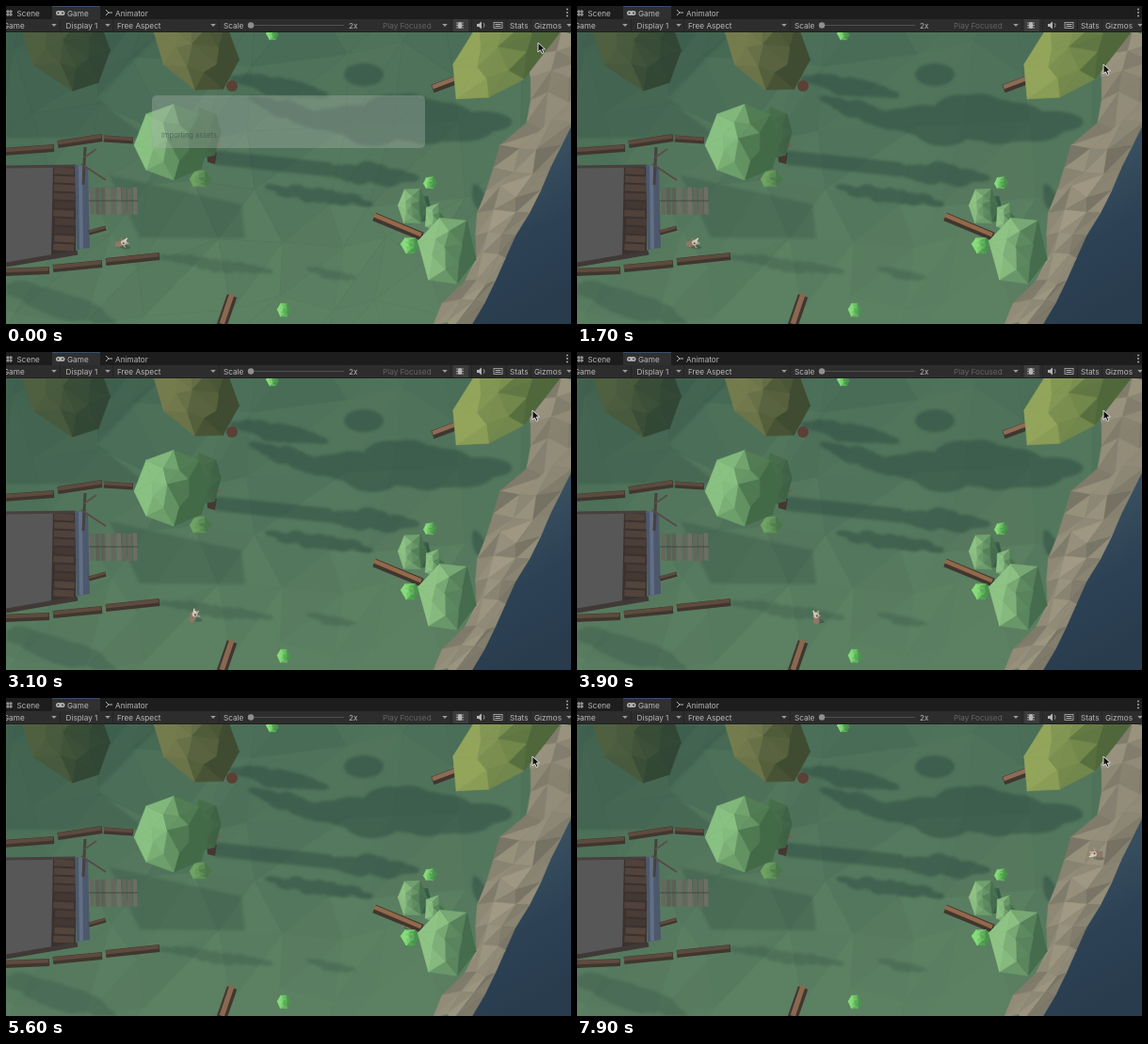
Write an HTML page with a canvas that moves like this. It is 600 by 338 pixels and loops after 8000 ms.

```html
<!DOCTYPE html>
<html lang="en">
<head>
<meta charset="utf-8">
<title>Game view</title>
<style>
html, body { margin: 0; width: 100%; height: 100%; overflow: hidden; background: #222; }
canvas { display: block; width: 100vw; height: 100vh; }
</style>
</head>
<body>
<canvas id="stage" width="600" height="338"></canvas>
<script>
const stage = document.getElementById('stage').getContext('2d');
const LOOP = 8000;
let g = stage;
let seed = 11;
const rnd = () => (seed = seed * 16807 % 2147483647) / 2147483647;
const jitter = size => (rnd() - 0.5) * size;
const mix = (a, b, k) => a + (b - a) * k;
const clamp = k => Math.max(0, Math.min(1, k));
const blend = (a, b, k) => `rgb(${a.map((v, i) => Math.round(mix(v, b[i], clamp(k))))})`;
const points = s => s.split(' ').map(p => p.split(',').map(Number));

// Smooth curve through keys of the form [position, value, value...].
function spline(keys, t) {
  const last = keys.length - 1;
  const i = keys.findIndex(k => k[0] > t);
  if (i <= 0) return keys[i ? last : 0].slice(1);
  const a = keys[i - 1], b = keys[i], span = b[0] - a[0], k = (t - a[0]) / span;
  const slope = (n, j) => n && n < last
    ? (keys[n + 1][j] - keys[n - 1][j]) / (keys[n + 1][0] - keys[n - 1][0]) : 0;
  return a.slice(1).map((v, n) => mix(v, b[n + 1], k * k * (3 - 2 * k))
    + span * k * (1 - k) * ((1 - k) * slope(i - 1, n + 1) - k * slope(i, n + 1)));
}

function layer(draw) {
  const outer = g, c = document.createElement('canvas');
  c.width = 600;
  c.height = 338;
  g = c.getContext('2d');
  draw();
  g = outer;
  return c;
}

function poly(pts, color, edge) {
  if (typeof pts === 'string') pts = points(pts);
  g.beginPath();
  pts.forEach(p => g.lineTo(p[0], p[1]));
  g.closePath();
  g.fillStyle = color;
  g.fill();
  if (edge) {
    g.strokeStyle = color;
    g.lineWidth = 0.7;
    g.stroke();
  }
}

function oval(x, y, rx, ry, color, turn = 0) {
  g.beginPath();
  g.ellipse(x, y, rx, ry, turn, 0, Math.PI * 2);
  g.fillStyle = color;
  g.fill();
}

function line(x1, y1, x2, y2, color, width = 1) {
  g.beginPath();
  g.moveTo(x1, y1);
  g.lineTo(x2, y2);
  g.strokeStyle = color;
  g.lineWidth = width;
  g.stroke();
}

const middle = pts => [0, 1].map(j => pts.reduce((s, p) => s + p[j], 0) / pts.length);

// Triangle mesh: place gives each node, tone the colour of each face.
function mesh(cols, rows, place, tone) {
  const nodes = Array.from({ length: rows + 1 }, (_, y) => Array.from({ length: cols + 1 }, (_, x) => place(x, y)));
  const face = (tri, x) => poly(tri, tone(...middle(tri), x), true);
  for (let y = 0; y < rows; y++) {
    for (let x = 0; x < cols; x++) {
      const [a, b] = nodes[y].slice(x), [c, d] = nodes[y + 1].slice(x);
      face([a, b, c], x);
      face([b, c, d], x);
    }
  }
}

// Faceted crown of a tree or bush, lit from the left.
function crown(x, y, rx, ry, turn, n, dark, light) {
  const ring = (scale, shift) => Array.from({ length: n }, (_, i) => {
    const a = (i + shift) * Math.PI * 2 / n + jitter(1.6 / n), s = scale * (1 + jitter(0.12));
    const u = rx * s * Math.cos(a), v = ry * s * Math.sin(a);
    return [x + u * Math.cos(turn) - v * Math.sin(turn), y + u * Math.sin(turn) + v * Math.cos(turn)];
  });
  const outer = ring(1.05, 0), inner = ring(0.55, 0.5), r = Math.max(rx, ry);
  const face = tri => {
    const [mx, my] = middle(tri);
    poly(tri, blend(dark, light, 0.55 - (mx - x) / r - (my - y) * 0.2 / r + jitter(0.3)), true);
  };
  outer.forEach((p, i) => {
    const j = (i + 1) % n;
    face([p, outer[j], inner[i]]);
    face([outer[j], inner[i], inner[j]]);
    face([inner[i], inner[j], [x - rx * 0.1, y - ry * 0.1]]);
  });
}

function log(x1, y1, x2, y2, w = 8, top = '#5d4b3e') {
  line(x1, y1, x2, y2, '#40362f', w);
  line(x1, y1 - w / 5, mix(x1, x2, 0.98), y2 - w / 5, top, w / 2);
}

function ground() {
  mesh(11, 6, (x, y) => [(x - 0.5) * 62 + jitter(46), (y - 0.1) * 66 + jitter(46)],
    (x, y) => blend([64, 99, 81], [92, 128, 98], 0.22 + y / 480 + x / 2600 + jitter(0.22)));
}

// Ragged leaf shadow: overlapping ovals strewn along a line.
function leaves(x1, y1, x2, y2, size) {
  const n = 9, turn = Math.atan2(y2 - y1, x2 - x1);
  for (let i = 0; i < n; i++) {
    const k = i / (n - 1), bulge = 0.45 + 0.55 * Math.sin(k * Math.PI);
    oval(mix(x1, x2, k), mix(y1, y2, k) + jitter(size * 0.5), size * 1.3, size * bulge, '#28443e', turn);
  }
}

function shadows() {
  const deep = layer(() => {
    leaves(250, 78, 330, 92, 10);
    leaves(270, 102, 350, 128, 10);
    leaves(350, 122, 505, 124, 25);
    oval(380, 73, 21, 12, '#28443e');
    line(222, 161, 345, 174, '#28443e', 15);
    leaves(345, 174, 425, 183, 11);
    leaves(285, 195, 380, 208, 8);
    leaves(500, 198, 506, 214, 7);
  });
  const soft = layer(() => {
    poly('0,28 165,28 96,98 150,140 0,140', '#28443e');
    poly('110,180 250,211 254,247 142,246', '#28443e');
    leaves(170, 266, 275, 283, 7);
    leaves(325, 281, 365, 289, 5);
    leaves(10, 300, 100, 330, 14);
  });
  g.filter = 'blur(1.5px)';
  g.globalAlpha = 0.44;
  g.drawImage(deep, 0, 0);
  g.globalAlpha = 0.25;
  g.drawImage(soft, 0, 0);
  g.filter = 'none';
  g.globalAlpha = 1;
}

function shore() {
  const sea = g.createLinearGradient(530, 180, 600, 300);
  sea.addColorStop(0, '#384f60');
  sea.addColorStop(0.5, '#2c4254');
  sea.addColorStop(1, '#283c4e');
  poly('600,110 480,338 600,338', sea);
  const bank = [[28, 553], [130, 552], [134, 533], [190, 510], [240, 499], [282, 497], [338, 452]];
  mesh(3, 13, (c, row) => {
    const y = 28 + row * 24, left = spline(bank, y)[0], right = 602 - (y - 125) / 2;
    const inside = c % 3 ? 1 : 0;
    return [mix(left, right, c / 3) + inside * jitter(12) + (1 - inside) * jitter(5), y + inside * jitter(18)];
  }, (x, y, c) => blend([108, 105, 92], [167, 159, 136], [0.5, 0.65, 0.4][c] + jitter(0.55)));
}

function house() {
  poly('0,170 52,169 55,268 0,276', '#575757');
  poly('50,169 75,170 74,262 48,266', '#3a3230');
  for (let y = 171; y < 255; y += 9) {
    line(51 + jitter(2), y + 4, 73 + jitter(2), y + 5, blend([67, 55, 50], [88, 72, 63], rnd()), 7);
  }
  line(0, 275, 76, 262, '#403937', 5);
  line(0, 171, 74, 170, '#46413f', 3);
  poly('73,169 87,171 89,257 75,259', '#4c586c');
  line(79, 170, 80, 258, '#626e84', 4);
  for (let x = 89; x < 140; x += 5.7) {
    poly([[x, 193 + jitter(3)], [x + 4.5, 193], [x + 5, 222], [x + 0.5, 222 + jitter(3)]],
      blend([89, 93, 83], [117, 116, 104], rnd()));
  }
  line(88, 207, 140, 207, 'rgba(50,60,55,.35)', 2);
  line(84, 150, 82, 190, '#45423f', 3);
  line(83, 161, 96, 152, '#5a4f47', 2);
  line(80, 168, 106, 185, '#574b44', 2);
  log(88, 241, 106, 236, 5);
  log(-3, 155, 51, 151);
  log(55, 147, 102, 140);
  log(104, 141, 135, 143, 7);
  log(-3, 283, 46, 281);
  log(50, 279, 102, 274);
  log(106, 272, 163, 266);
}

const bush = (x, y, r) => crown(x, y, r, r, 0, 6, [72, 150, 75], [135, 222, 122]);

function trees() {
  const dark = [68, 108, 77], light = [143, 195, 133];
  crown(66, 40, 52, 40, 0.9, 8, [49, 70, 52], [79, 96, 64]);
  oval(240, 85, 6, 6, '#5b4036');
  crown(203, 44, 52, 38, 1, 8, [64, 76, 49], [116, 124, 78]);
  poly('213,154 224,156 222,168 214,166', '#443831');
  line(218, 151, 228, 147, '#756253', 3);
  crown(206, 184, 11, 9, 0, 6, [75, 120, 75], [112, 164, 99]);
  crown(208, 136, 19, 27, 0, 7, [62, 96, 69], [78, 119, 79]);
  crown(175, 145, 39, 40, 0, 8, [66, 106, 71], [137, 193, 130]);
  log(453, 88, 480, 78, 9, '#8c6c55');
  crown(529, 47, 66, 36, -0.75, 8, [79, 103, 58], [146, 165, 91]);
  log(391, 224, 442, 245, 9, '#94694a');
  crown(443, 215, 8, 15, 0, 6, [50, 86, 68], [62, 104, 76]);
  crown(432, 213, 15, 21, 0, 6, dark, light);
  crown(455, 224, 11, 15, 0, 5, dark, light);
  bush(450, 188, 6.5);
  bush(429, 254, 9);
  crown(469, 260, 30, 36, 0.2, 6, dark, light);
  bush(283, 30, 6);
  bush(295, 323, 7);
  log(240, 308, 229, 340, 11, '#8a6850');
}

function label(text, x, y, color = '#b9b9b9') {
  g.fillStyle = color;
  g.fillText(text, x, y);
}

const dropdown = x => poly([[x - 2.8, 19], [x + 2.8, 19], [x, 22]], '#999');

function toolbar() {
  poly('0,0 600,0 600,14 0,14', '#1d1d1d');
  poly('49,0 100,0 100,14 49,14', '#303030');
  line(49, 0.5, 100, 0.5, '#34506e');
  poly('0,14 600,14 600,28 0,28', '#2d2d2d');
  line(0, 27.5, 600, 27.5, '#202020');
  g.font = '8.2px Inter, Roboto, sans-serif';
  label('Scene', 11.5, 10.6);
  label('Game', 65, 10.6);
  label('Animator', 116, 10.6);
  label('Game', -3, 23.6);
  label('Display 1', 63.5, 23.6);
  label('Free Aspect', 118, 23.6);
  label('Scale', 231, 23.6);
  label('2x', 364, 23.6);
  label('Play Focused', 400, 23.6, '#646464');
  label('Stats', 535, 23.6);
  label('Gizmos', 561, 23.6);
  [51, 108, 220, 466, 598].forEach(dropdown);
  [57, 113, 226, 472, 494, 531, 557].forEach(x => line(x + 0.5, 14, x + 0.5, 27, '#242424'));
  line(258, 20.5, 359, 20.5, '#505050', 1.2);
  oval(260, 20.5, 3.2, 3.2, '#8f8f8f');
  const ink = '#b5b5b5';
  [2, 5].forEach(v => {
    line(v, 4, v, 11, ink);
    line(0, v + 4, 7, v + 4, ink);
  });
  line(55.5, 7.5, 60, 7.5, ink, 4.5);
  [55.5, 60].forEach(x => {
    oval(x, 7.5, 2.5, 2.5, ink);
    oval(x, 7.5, 0.9, 0.9, '#333');
  });
  [4, 10].forEach(y => line(106, y, 109, 7, ink));
  line(109, 7, 113, 7, ink);
  [3.5, 7, 10.5].forEach(y => oval(596, y, 0.9, 0.9, ink));
  poly('475,14 491,14 491,27 475,27', '#3c3c3c');
  oval(482, 20.5, 2.3, 3.6, ink);
  [18, 20.5, 23].forEach(y => line(478, y, 486, y, ink, 0.8));
  poly('500,19 502,19 505,16.5 505,24.5 502,22 500,22', ink);
  g.beginPath();
  g.arc(505, 20.5, 3, -0.9, 0.9);
  g.strokeStyle = ink;
  g.stroke();
  g.strokeRect(518, 17.5, 9, 6);
  [19.5, 21.5].forEach(y => line(519.5, y, 525.5, y, ink));
}

const back = layer(() => { ground(); shadows(); shore(); house(); });
const front = layer(() => { trees(); toolbar(); });

const START = 1700;
const walk = [[START, 123, 252], [2500, 163, 274], [3900, 254, 282], [4800, 335, 265], [6500, 513, 210], [7900, 551, 166]];
const pointer = [[0, 565, 39], [800, 567, 33], [1300, 559, 62]];

function walker(t) {
  const [x, y] = spline(walk, t);
  const swing = t > START ? Math.sin(t / 75) * 1.5 : 0;
  oval(x + 3, y + 4, 6, 2.2, 'rgba(35,55,45,.35)', 0.15);
  g.save();
  g.translate(x, y);
  g.rotate(-0.3 - 2.8 * clamp((t - START) / 4800));
  g.scale(0.78, 0.78);
  line(-5, 2, -8, 5 + swing, '#66564a', 2);
  line(1, 3, 3, 7 - swing, '#a59683', 2);
  line(0, -3, 2, -6 + swing, '#8d7965', 2);
  oval(-4, 0, 5.5, 4.2, '#8d7766');
  oval(3, 0, 4.2, 3.6, '#cdc3b0');
  line(4, -2, 9, -4, '#ded5c4', 2);
  line(4, 2, 9, 3, '#b8a78d', 2);
  oval(2, 1, 1.3, 1.3, '#574b42');
  g.restore();
}

function dialog(t) {
  const alpha = 1 - t / 150;
  if (alpha <= 0) return;
  g.save();
  g.globalAlpha = alpha;
  g.beginPath();
  g.roundRect(155, 95, 290, 56, 5);
  g.fillStyle = 'rgba(165,178,168,.38)';
  g.fill();
  g.font = '7.5px Inter, sans-serif';
  label('Importing assets', 165, 140, 'rgba(55,78,65,.65)');
  g.restore();
}

function cursor(t) {
  const [x, y] = spline(pointer, t);
  g.save();
  g.translate(x, y);
  poly('0,0 0,10 2.4,7.8 4.2,11.5 6,10.7 4.3,7.1 7.4,6.8', '#111');
  g.strokeStyle = '#eee';
  g.lineWidth = 0.9;
  g.stroke();
  g.restore();
}

function frame(now) {
  const t = now % LOOP;
  g.drawImage(back, 0, 0);
  walker(t);
  g.drawImage(front, 0, 0);
  dialog(t);
  cursor(t);
  requestAnimationFrame(frame);
}
requestAnimationFrame(frame);
</script>
</body>
</html>
```
